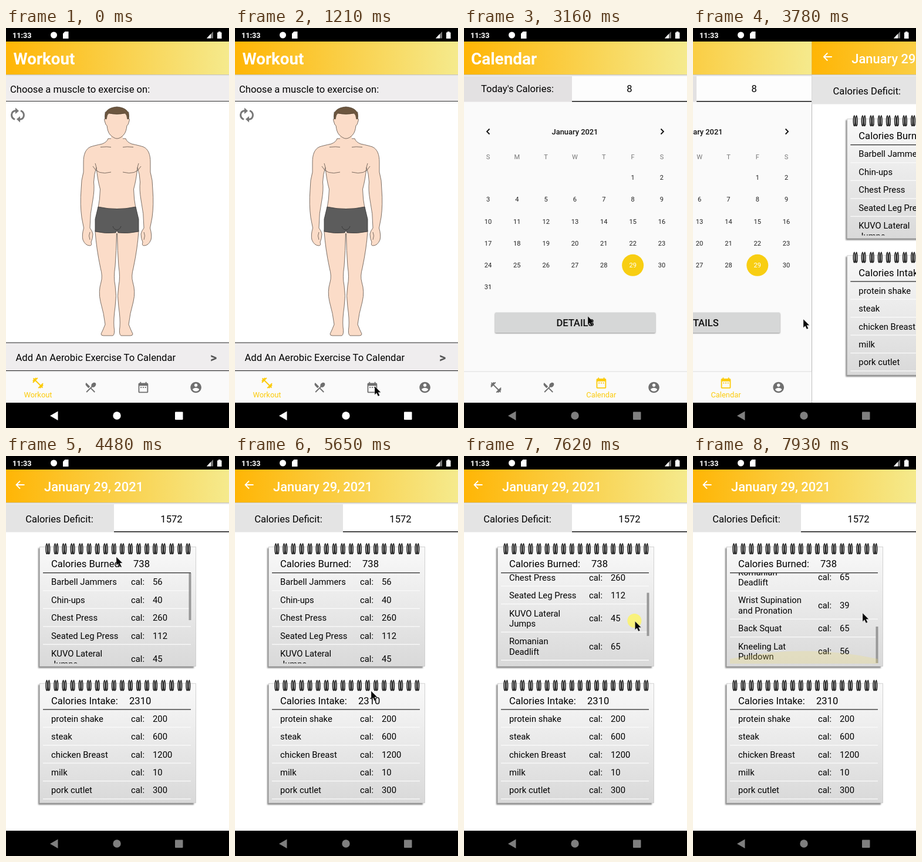
These frames come from a looping animation (380x680 px, 8000 ms). An HTML page:

```html
<!DOCTYPE html>
<html lang="en">
<head>
<meta charset="utf-8">
<style>
html, body { margin: 0; width: 100%; height: 100%; overflow: hidden; background: #000; }
svg { display: block; width: 380px; height: 680px; font-family: Roboto, "Noto Sans", sans-serif; }
</style>
</head>
<body>
<svg id="stage" viewBox="0 0 380 680"></svg>
<script>
const LOOP = 8000, SCROLL = 186.4;
const $ = id => document.getElementById(id);

const text = (x, y, size, str, attrs = '') => `<text x="${x}" y="${y}" font-size="${size}" ${attrs}>${str}</text>`;
const mid = (x, y, size, str, attrs = '') => text(x, y, size, str, 'text-anchor="middle" ' + attrs);
const rect = (x, y, w, h, fill, attrs = '') => `<rect x="${x}" y="${y}" width="${w}" height="${h}" fill="${fill}" ${attrs}/>`;
const path = (d, attrs = '') => `<path d="${d}" ${attrs}/>`;
const line = (d, color, w = 1) => path(d, `fill="none" stroke="${color}" stroke-width="${w}"`);

const icons = [
  'M20.57 14.86L22 13.43 20.57 12 17 15.57 8.43 7 12 3.43 10.57 2 9.14 3.43 7.71 2 5.57 4.14 4.14 2.71 2.71 4.14l1.43 1.43L2 7.71l1.43 1.43L2 10.57 3.43 12 7 8.43 15.57 17 12 20.57 13.43 22l1.43-1.43L16.29 22l2.14-2.14 1.43 1.43 1.43-1.43-1.43-1.43L22 16.29z',
  'M8.1 13.34l2.83-2.83L3.91 3.5c-1.56 1.56-1.56 4.09 0 5.66l4.19 4.18zm6.78-1.81c1.53.71 3.68.21 5.27-1.38 1.91-1.91 2.28-4.65.81-6.12-1.46-1.46-4.2-1.1-6.12.81-1.59 1.59-2.09 3.74-1.38 5.27L3.7 19.87l1.41 1.41L12 14.41l6.88 6.88 1.41-1.41L13.41 13l1.47-1.47z',
  'M9 11H7v2h2v-2zm4 0h-2v2h2v-2zm4 0h-2v2h2v-2zm2-7h-1V2h-2v2H8V2H6v2H5c-1.1 0-2 .9-2 2v14c0 1.1.9 2 2 2h14c1.1 0 2-.9 2-2V6c0-1.1-.9-2-2-2zm0 16H5V9h14v11z',
  'M12 2C6.48 2 2 6.48 2 12s4.48 10 10 10 10-4.48 10-10S17.52 2 12 2zm0 3c1.66 0 3 1.34 3 3s-1.34 3-3 3-3-1.34-3-3 1.34-3 3-3zm0 14.2c-2.5 0-4.71-1.28-6-3.22.03-1.99 4-3.08 6-3.08 1.99 0 5.97 1.09 6 3.08-1.29 1.94-3.5 3.22-6 3.22z'
];

const header = (title, x, y, size, weight) =>
  rect(-3, 23, 383, 56, 'url(#gold)') + rect(-3, 79, 383, 1.5, '#c9c6bd') + rect(-3, 80.5, 383, 1.5, '#ececec') +
  text(x, y, size, title, `font-weight="${weight}" fill="#fff"`);

const tabBar = (active, label) =>
  rect(0, 584, 380, 53, '#fafafa') + rect(0, 583.5, 380, 1, '#dedede') +
  icons.map((d, i) => {
    const on = i === active;
    return path(d, `fill="${on ? '#fccb0c' : '#6f6f6f'}" transform="translate(${54.5 + 89.7 * i} ${on ? 603.5 : 611}) scale(.93) translate(-12 -12)"`);
  }).join('') + mid(54.5 + 89.7 * active, 627.5, 12.9, label, 'fill="#fccb0c"');

const skin = 'fill="#fbdcc8" stroke="#5c5047" stroke-width=".8" stroke-linejoin="round"';
const half =
  path('M189 188H204Q206 194 214 197Q228 200 234 202C243 206 246 216 246 228L246 245Q250 258 250 275Q252 300 249 322L245.500 340Q249 352 247 360Q243 370 235 370Q231 370 233 364Q230 358 230 350Q231 345 235 340Q235 315 230 292Q227 275 228.500 262Q228 248 224 237Q222 258 217.500 274Q218 292 221 306L226 346Q224 375 217 408Q213 422 216 432Q221 448 217 465Q211 486 209 504Q213 514 216 520Q216 523 212 523H196Q192 521 194 508Q195 495 192 474Q189 455 192 438Q195 424 192 405Q190 380 189.500 349', skin) +
  line('M195 203Q207 201 217 202.500M199 245Q222 251 230 235M224 237L226 230M235 347Q238 353 235 360', '#5c5047', .8);
const body = half + `<g transform="matrix(-1 0 0 1 378 0)">${half}</g>` +
  rect(179, 180, 20, 25, '#fbdcc8') + rect(188, 188, 2, 118, '#fbdcc8') +
  path('M169 155Q167 153 168 158L170 164L172 166Q173 176 177 181Q184 188 189 188Q195 188 201 181Q205 176 206 166L208 164L210 158Q211 153 209 155V143H169z', skin) +
  path('M169 154Q166 136 189 134Q212 136 209 154L207 155Q206 147 203 145Q189 148 175 145Q172 147 171 155z', 'fill="#6c563f" stroke="#463727" stroke-width=".7"') +
  path('M157 304Q189 311 221 304L226 325V346Q208 350 191 348L189 344L187 348Q169 350 152 346V325z', 'fill="#5c5c5c" stroke="#333" stroke-width=".8"') +
  line('M182 337Q184 343 189 343Q194 343 196 337', '#333', .8);

const refresh = `<g transform="translate(20 148)">` +
  [0, 180].map(a => `<g transform="rotate(${a})">${line('M-5 7.500C-13 4-12-7-3-7.500', '#777', 3)}${path('M-4-12.500L2-7L-4-2z', 'fill="#777"')}</g>`).join('') + '</g>';

const workout = rect(0, 23, 380, 614, '#fff') + header('Workout', 12.5, 62, 27.7, 700) +
  rect(0, 82, 380, 42, '#efedee') + rect(0, 124, 380, 1, '#333') +
  text(7, 110, 16.6, 'Choose a muscle to exercise on:') + refresh + body +
  rect(0, 535, 380, 47, '#efedee') + rect(0, 534.5, 380, 1, '#222') + rect(0, 582, 380, 1, '#222') +
  text(16.5, 565.5, 16.6, 'Add An Aerobic Exercise To Calendar') +
  text(348, 568, 22, '&gt;', 'font-weight="700" fill="#555"') + tabBar(0, 'Workout');

const col = i => 41 + 49.33 * i;
let days = '';
for (let d = 1; d <= 31; d++) {
  const n = d + 4, x = col(n % 7), y = 258.2 + 37.25 * Math.floor(n / 7);
  if (d === 29) days += `<circle cx="${x}" cy="403.300" r="18.500" fill="#f8ce12"/>`;
  days += mid(x, y, 11.1, d, `fill="${d === 29 ? '#fff' : '#222'}"`);
}
const calendar = rect(0, 23, 380, 614, '#fafafa') + header('Calendar', 12, 62, 27.9, 700) +
  rect(0, 82, 184, 43.5, '#e3e1e2') + rect(184, 82, 196, 42, '#fdfdfd') + rect(184, 124, 196, 1.5, '#111') +
  mid(91, 109, 16.6, "Today's Calories:") + mid(282, 109, 16.6, '8') +
  line('M43.500 171.500L39 176L43.500 180.500M335.500 171.500L340 176L335.500 180.500', '#111', 1.8) +
  mid(189, 180.5, 12.9, 'January 2021', 'font-weight="500" fill="#111"') +
  [...'SMTWTFS'].map((c, i) => mid(col(i), 222.5, 11.1, c, 'fill="#777"')).join('') + days +
  rect(53, 485, 273, 34, '#888', 'rx="1" filter="url(#soft)"') + rect(53, 483.5, 273, 34.5, '#d6d7d7', 'rx="1.500"') +
  mid(189.5, 507, 16.6, 'DETAILS', 'font-weight="500" fill="#111"') + tabBar(2, 'Calendar');

function rows(list) {
  let y = 198.5;
  return list.map(([name, cal]) => {
    const parts = name.split('|'), two = parts.length > 1, top = y, base = top + 20.9;
    y += two ? 47.8 : 30.45;
    return parts.map((p, i) => text(77, base + 17.4 * i, 14.8, p)).join('') +
      text(213, base + (two ? 8.7 : 0), 14.8, 'cal:') + text(250, base + (two ? 8.7 : 0), 14.8, cal) +
      rect(63, y - .7, 252, 1.3, '#fafafa');
  }).join('');
}
const wire = 'M-.5-9C-2.800-7-2.600 5-.8 8.500C1.200 8 1.400-5-.5-9z';
const rings = Array.from({ length: 18 }, (_, i) =>
  `<g transform="translate(${71.5 + 14.06 * i} 158)"><ellipse cy="6" rx="3.600" ry="3" fill="#444"/>` +
  [-1.4, 2.4].map(d => path(wire, `transform="translate(${d} 0)" fill="#aaa" stroke="#222" stroke-width="1.400"`)).join('') + '</g>'
).join('');
const pad = (title, total, x, list, id) =>
  rect(55, 156.5, 265, 204, '#888', 'filter="url(#soft)"') +
  rect(57.5, 154.5, 266, 203, 'url(#paper)', 'stroke="#c8c8c8" stroke-width=".8"') +
  text(77, 189.4, 16.6, title) + text(x, 189.4, 16.6, total) +
  `<g clip-path="url(#window)"><g id="${id}">${rows(list)}</g></g>` +
  rect(63, 198, 252, 1.2, '#222') + rings;

const burned = [['Barbell Jammers', 56], ['Chin-ups', 40], ['Chest Press', 260], ['Seated Leg Press', 112],
  ['KUVO Lateral|Jumps', 45], ['Romanian|Deadlift', 65], ['Wrist Supination|and Pronation', 39],
  ['Back Squat', 65], ['Kneeling Lat|Pulldown', 56]];
const intake = [['protein shake', 200], ['steak', 600], ['chicken Breast', 1200], ['milk', 10], ['pork cutlet', 300]];

const details = rect(-3, 23, 383, 614, '#fff') + header('January 29, 2021', 65, 60, 21.9, 500) +
  line('M31.500 49H18M24 42.500L17.500 49L24 55.500', '#fff', 1.8) +
  rect(-3, 82, 187, 47.5, '#e4e4e4') + rect(184, 128, 196, 1.5, '#111') +
  mid(91, 112.5, 16.6, 'Calories Deficit:') + mid(282, 112.5, 16.6, '1572') +
  pad('Calories Burned:', 738, 217, burned, 'list') +
  rect(311.5, 199, 4, 80, '#999', 'id="bar"') +
  path('M63 353V345Q189 318 315 345V353z', 'id="glow" fill="#f3dc6a" opacity="0"') +
  `<g transform="translate(0 232.300)">${pad('Calories Intake:', 2310, 210, intake, 'meals')}</g>`;

const status = rect(0, 0, 380, 23, '#000') + text(11, 16.7, 12.6, '11:33', 'font-weight="700" fill="#fff"') +
  '<circle cx="81.500" cy="12" r="5.500" fill="#fff"/>' +
  path('M100.500 6H106.500V18H97V9.500z', 'fill="#fff"') +
  path('M353 6V17.500H342z', 'fill="#777"') + path('M349 10V17.500H342z', 'fill="#fff"') +
  path('M360 7.500H362V6H365.500V7.500H367.500V18H360z', 'fill="#fff"');
const nav = rect(0, 637, 380, 43, '#000') +
  `<g id="nav">${path('M88.500 651.500V667L75 659.200z')}<circle cx="189" cy="659" r="6.700"/><rect x="288" y="652.500" width="13.500" height="13.500" rx="1"/></g>`;

$('stage').innerHTML = `<defs>
  <linearGradient id="gold"><stop stop-color="#ffb504"/><stop offset="1" stop-color="#f5ea8d"/></linearGradient>
  <linearGradient id="paper" x2="0" y2="1"><stop stop-color="#f9f9f9"/><stop offset="1" stop-color="#d9d9d9"/></linearGradient>
  <filter id="soft"><feGaussianBlur stdDeviation="1.1"/></filter>
  <clipPath id="window"><rect x="60" y="199" width="258" height="153.500"/></clipPath>
</defs>
<g id="workout">${workout}</g><g id="calendar">${calendar}</g><g id="details">${details}</g>${status}${nav}
<g id="mouse"><circle id="press" cx="-1" cy="-1" r="12" fill="#fff658" opacity=".75"/>
${path('M0 0V14.500L3.300 11.500L5.800 17L8.500 15.800L6 10.500H10.500z', 'fill="#080808" stroke="#fff" stroke-opacity=".5" stroke-width=".6"')}</g>`;

// Pointer stops: time, x, y
const stops = [[0, 150, 690], [70, 150, 672], [250, 112, 480], [400, 190, 285], [560, 306, 420], [750, 240, 610],
  [900, 238, 609], [1250, 238, 609], [1690, 240, 488], [2070, 240, 488], [2150, 222, 474], [2350, 300, 210],
  [2480, 345, 46], [2650, 310, 220], [2800, 226, 478], [2930, 211, 490], [3400, 211, 490], [3780, 188, 495],
  [4140, 190, 380], [4480, 188, 172], [4630, 197, 165], [4900, 230, 158], [5200, 215, 300], [5480, 202, 430],
  [5550, 205, 430], [5960, 303, 229], [6060, 303, 229], [6290, 314, 225], [6360, 314, 225], [6520, 317, 223],
  [7100, 317, 223], [7350, 300, 330], [7440, 300, 330], [7700, 289, 267], [8000, 289, 267]];
const presses = [[1060, 1200], [3010, 3150], [6940, 7160], [7420, 7700]];

const ramp = (t, a, b) => Math.min(1, Math.max(0, (t - a) / (b - a)));
const ease = u => u * u * (3 - 2 * u);

function slope(i, k) {
  const a = stops[i - 1], b = stops[i], c = stops[i + 1];
  if (!a || !c || (b[k] - a[k]) * (c[k] - b[k]) <= 0) return 0;
  return (c[k] - a[k]) / (c[0] - a[0]);
}
function pointer(t, k) {
  const i = stops.findIndex(s => s[0] > t) - 1, a = stops[i], b = stops[i + 1];
  const d = b[0] - a[0], u = (t - a[0]) / d, e = ease(u);
  return a[k] + (b[k] - a[k]) * e + d * u * (1 - u) * ((1 - u) * slope(i, k) - u * slope(i + 1, k));
}

const show = (id, on) => $(id).setAttribute('visibility', on ? 'visible' : 'hidden');
const move = (id, x, y) => $(id).setAttribute('transform', `translate(${x} ${y})`);

function draw(now) {
  const t = now % LOOP;
  const slide = ease(ramp(t, 3500, 4087));
  show('workout', t < 1220);
  show('calendar', t >= 1220 && slide < 1);
  show('details', slide > 0);
  move('calendar', -380 * slide, 0);
  move('details', 386 * (1 - slide), 0);

  const gray = Math.round(255 - 128 * ramp(t, 1220, 1650));
  $('nav').setAttribute('fill', `rgb(${gray},${gray},${gray})`);

  const p = ease(ramp(t, 7440, 7880));
  move('list', 0, -SCROLL * p);
  $('bar').setAttribute('y', 199 + 91 * p);
  $('bar').setAttribute('height', 80 - 18 * p);
  $('bar').setAttribute('opacity', t < 7440 ? 1 - ramp(t, 4900, 5200) : 1);
  $('glow').setAttribute('opacity', .24 * ramp(t, 7800, 7920));

  move('mouse', pointer(t, 1), pointer(t, 2));
  show('press', presses.some(([a, b]) => t >= a && t < b));
  requestAnimationFrame(frame);
}
const start = performance.now();
function frame() { draw(performance.now() - start); }
frame();
</script>
</body>
</html>
```
